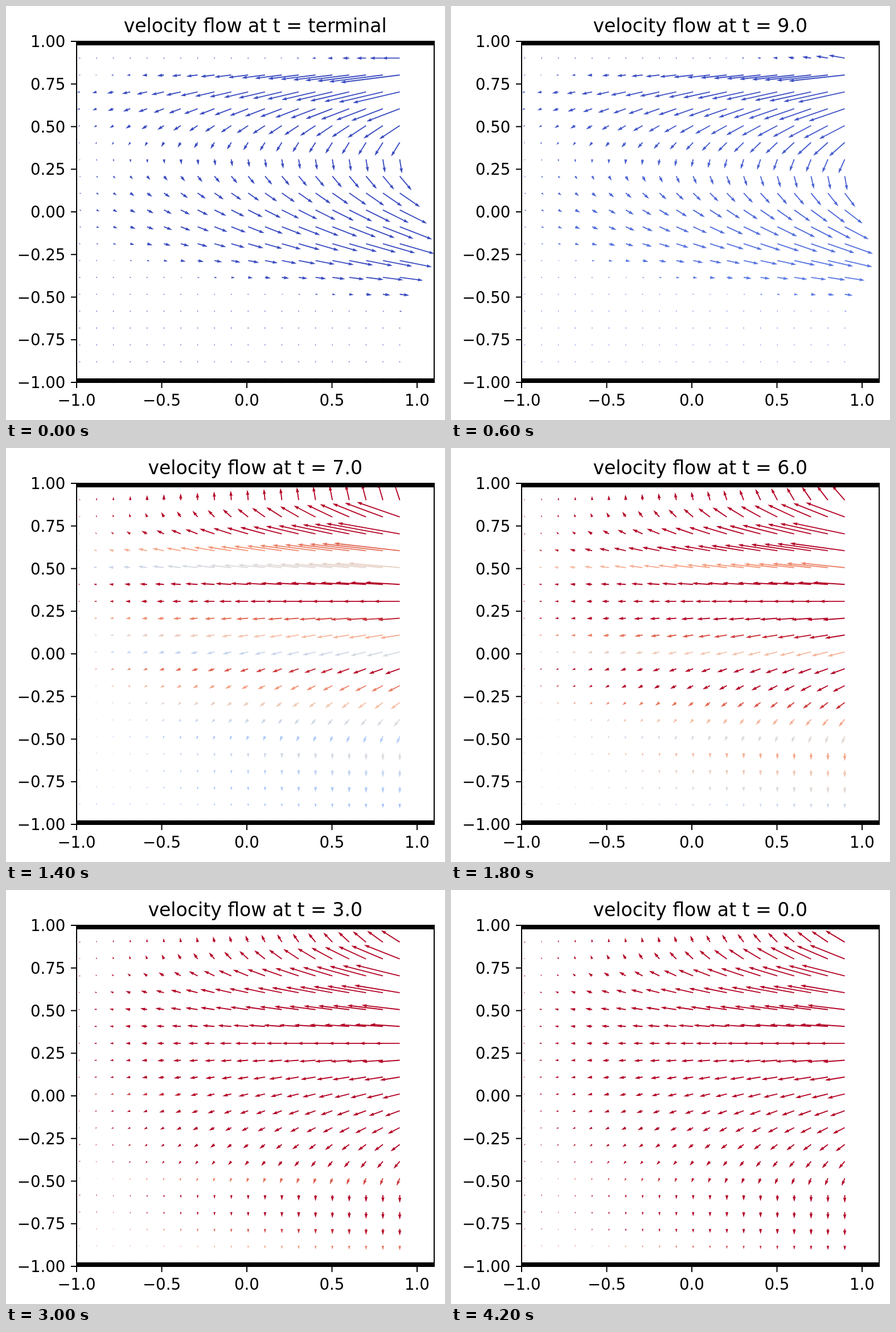
Recreate the animation shown at these times as an HTML page with a canvas. Size 771x726 px, loop 4400 ms.

```html
<!DOCTYPE html>
<html lang="en">
<head>
<meta charset="utf-8">
<title>Velocity flow</title>
<style>
html, body { margin: 0; width: 100%; height: 100%; overflow: hidden; background: #fff; }
canvas, svg { position: absolute; left: 0; top: 0; }
text { font-family: "DejaVu Sans", sans-serif; font-size: 27.6px; fill: #000; }
#title { font-size: 33.1px; }
</style>
</head>
<body>
<canvas id="field" width="771" height="726"></canvas>
<svg id="axes" width="771" height="726" viewBox="0 0 771 726">
  <path d="M124 65.4H752M124 656.6H752" stroke="#000" stroke-width="7"/>
  <rect x="124" y="62" width="628" height="598" fill="none" stroke="#000" stroke-width="2"/>
  <text id="title" x="437.7" y="45.5" text-anchor="middle"></text>
</svg>
<script>
const ROWS = 20, COLS = 20, STEP = 200, FRAMES = 22;
const LEFT = 129.5, TOP = 91.4, GAP = 29.58;
const SHAFT = 1.88;
const { abs, exp, min, max, pow, floor } = Math;
const ctx = document.getElementById('field').getContext('2d');
const axes = document.getElementById('axes');
const title = document.getElementById('title');

function add(tag, attrs, text = '') {
  const el = document.createElementNS('http://www.w3.org/2000/svg', tag);
  for (const k in attrs) el.setAttribute(k, attrs[k]);
  el.textContent = text;
  axes.append(el);
}
const label = (v, digits) => v.toFixed(digits).replace('-', '\u2212');
const tick = d => add('path', { d, stroke: '#000', 'stroke-width': 2 });

for (let i = 0; i < 9; i++) {
  const y = 62 + i * 74.75;
  tick(`M114 ${y}H124`);
  add('text', { x: 104.4, y: y + 10, 'text-anchor': 'end' }, label(1 - i / 4, 2));
}
for (let i = 0; i < 5; i++) {
  const x = 124 + i * 149.5;
  tick(`M${x} 660V670`);
  add('text', { x, y: 700.5, 'text-anchor': 'middle' }, label(i / 2 - 1, 1));
}

const clamp = x => min(1, max(0, x));
const cutoff = (x, width) => 1 / (1 + exp(x / width));

// Flow near the terminal time: a vortex. r = row, s = strength along x.
function vortex(r, s, n) {
  const e = min(1, n / 3) * s;
  const bend = (4.8 + 1.4 * e) * pow(max(0, 11 + 0.5 * e - r), 1.55 - 0.18 * e);
  const wall = 1 - 0.77 * exp(-3 * r);
  const grow = pow(s, 1 + 5 * exp(-1.7 * r) + 0.9 * exp((r - 12) / 1.4));
  return [
    grow * wall * (62 - 9 * e - bend) * cutoff(r - 13.4, 0.6),
    grow * 25 * (1 - exp((0.25 * e - r) / 1.35)) * cutoff(r - 11.8, 0.9)
  ];
}

// Settled flow: a jet to the left whose bump relaxes with time.
function jet(r, s, n) {
  const bump = 29 + 39 * exp(-max(0, n - 7) / 2.8);
  const wall = exp(-2 * r);
  const u = 52 * Math.cos(Math.PI * min(r, 15) / 30) * (1 - bump / 70 * wall)
    + bump * exp(-pow((r - 2.7) / 1.9, 2));
  const w = 18 * (1 - exp((6 - r) / 5.5)) * (1 - exp((r - 19) / 1.4))
    + 24 * (1 - bump / 80) * wall;
  return [-u * pow(s, 1 + 2.4 * exp(-r / 2)), w * s];
}

// Colour value: falls within each band of five rows and grows with n.
function heat(r, s, n) {
  const band = floor(r / 5), fall = pow(1 - r % 5 / 4, 1.15);
  const low = 1.35 - 0.25 * band, high = 5.2 - 1.3 * band;
  const grown = Math.sin(clamp((n - 3) / 18) * Math.PI / 2);
  return 0.008 * r * min(1, n / 3)
    + (low + (high - low) * fall) * pow(grown, 1 + 0.6 * pow(r / 19, 3)) * (0.83 + 0.32 * s);
}

const STOPS = [[59, 76, 192], [98, 130, 234], [141, 176, 254], [184, 208, 249], [221, 220, 220],
               [245, 196, 173], [244, 154, 123], [222, 96, 77], [180, 4, 38]];
function coolwarm(v) {
  const f = clamp(v) * 8, i = min(7, floor(f));
  return `rgb(${STOPS[i].map((c, j) => Math.round(c + (STOPS[i + 1][j] - c) * (f - i)))})`;
}

function arrow(x, y, u, w, color) {
  const len = Math.hypot(u, w);
  ctx.fillStyle = color;
  ctx.beginPath();
  if (len < SHAFT) {
    ctx.arc(x, y, SHAFT * 0.45, 0, 7);
    ctx.fill();
    return;
  }
  const k = SHAFT * min(1, len / (SHAFT * 5));
  const neck = len - 4.5 * k, back = len - 5 * k;
  ctx.save();
  ctx.translate(x, y);
  ctx.rotate(Math.atan2(w, u));
  ctx.moveTo(0, -k / 2);
  ctx.lineTo(neck, -k / 2);
  ctx.lineTo(back, -k * 1.5);
  ctx.lineTo(len, 0);
  ctx.lineTo(back, k * 1.5);
  ctx.lineTo(neck, k / 2);
  ctx.lineTo(0, k / 2);
  ctx.fill();
  ctx.restore();
}

function draw(n) {
  const mix = pow(1 - clamp((n - 3) / 4), 2);
  title.textContent = 'velocity flow at t = ' + (n ? (10.5 - n / 2).toFixed(1) : 'terminal');
  ctx.clearRect(0, 0, 771, 726);
  ctx.save();
  ctx.beginPath();
  ctx.rect(124, 62, 628, 598);
  ctx.clip();
  for (let r = 0; r < ROWS; r++) {
    for (let c = 0; c < COLS; c++) {
      const s = (c + 1.75) / (COLS + 0.75);
      const a = vortex(r, s, n), b = jet(r, s, n);
      const [u, w] = a.map((v, i) => b[i] + (v - b[i]) * mix);
      arrow(LEFT + c * GAP, TOP + r * GAP, u, w, coolwarm(heat(r, s, n)));
    }
  }
  ctx.restore();
}

let shown = -1;
function play() {
  const n = floor(performance.now() / STEP) % FRAMES;
  if (n !== shown) draw(shown = n);
  requestAnimationFrame(play);
}
play();
</script>
</body>
</html>
```
